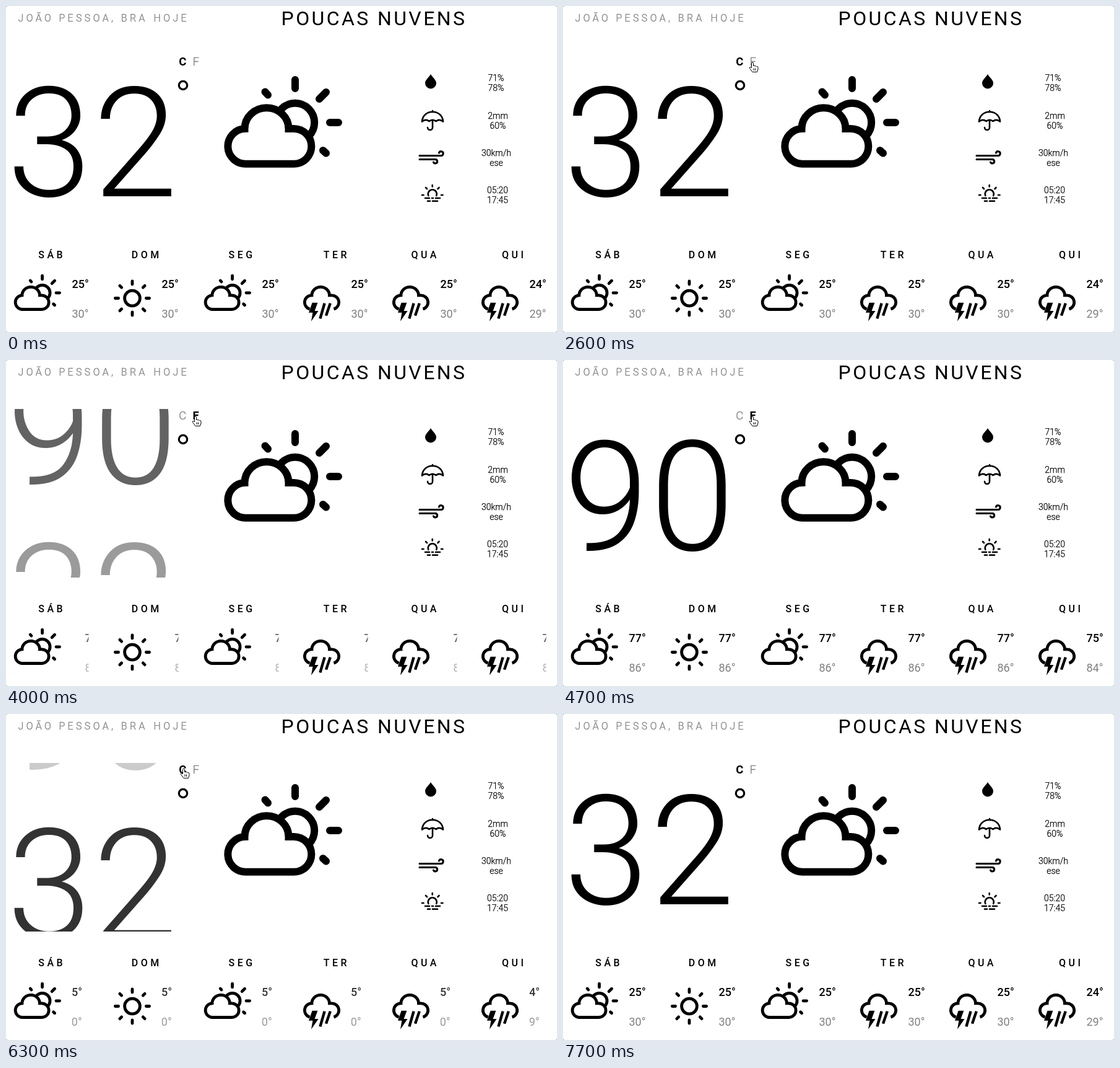
Recreate the animation shown at these times as an HTML page. Size 890 by 526 pixels, loop 7.8 s.

```html
<!DOCTYPE html>
<html lang="pt">
<head>
<meta charset="utf-8">
<title>Tempo</title>
<style>
html, body { margin: 0; width: 100%; height: 100%; overflow: hidden; background: #999; }
#stage { display: block; width: 890px; height: 526px; background: #fff; border-radius: 3px; font-family: Roboto, sans-serif; }
.line { fill: none; stroke: #000; }
.round { stroke-linecap: round; stroke-linejoin: round; }
.grey { fill: #808080; }
.place { font-size: 16px; font-weight: 300; letter-spacing: 4.35px; fill: #808080; stroke: #808080; stroke-width: .3; }
.title { font-size: 32px; letter-spacing: 3.4px; }
.big { font-size: 246px; font-weight: 300; letter-spacing: 2.6px; }
.day { font-size: 16px; font-weight: 500; letter-spacing: 4.5px; }
.deg { font-size: 18px; }
.low { font-weight: 500; }
.info { font-size: 14px; font-weight: 300; text-anchor: middle; stroke: #000; stroke-width: .25; }
.unit { font-size: 18.5px; font-weight: 300; fill: #808080; stroke: #808080; stroke-width: .3; }
.unit.on { font-weight: 700; fill: #000; stroke: none; }
</style>
</head>
<body>
<svg id="stage" viewBox="0 0 890 526">
  <defs>
    <g id="cloudsun" class="line" stroke-width="12">
      <circle cx="467" cy="188" r="31.2"/>
      <path class="round" d="M467 119v14M506 150l11-11M523 188h14M512 233l5 4.5M418.5 138.5l4.5 5"/>
      <path fill="#fff" d="M385.5 198A35.5 33.7 0 0 1 456.500 198H465A28.3 28.3 0 0 1 465 254.700H388A28.3 28.3 0 0 1 385.5 198Z"/>
    </g>
    <g id="sun" class="line round" stroke-width="4.8">
      <circle r="12.4"/>
      <path id="rays"/>
    </g>
    <g id="storm">
      <path class="line" stroke-width="12" d="M377 253.5A28.3 28.3 0 0 1 385.5 198A35.5 33.7 0 0 1 456.5 198H465A28.3 28.3 0 0 1 474 253.5"/>
      <path d="M387 228H409L397 261H412L383 303L389 268H373Z"/>
      <path class="line" stroke-width="11" d="M437 230L419 292M460 230L443 280"/>
    </g>
  </defs>

  <text class="place" x="19.5" y="25">JOÃO PESSOA, BRA</text>
  <text class="place" x="238.6" y="25">HOJE</text>
  <text class="title" x="444.6" y="30.5">POUCAS NUVENS</text>

  <svg y="79" width="276" height="272">
    <g class="celsius"><text class="big" x="1.8" y="227.5">32</text></g>
    <g class="fahr"><text class="big" x="1.8" y="227.5">90</text></g>
  </svg>
  <text id="unitC" class="unit" x="279.2" y="95.5">C</text>
  <text id="unitF" class="unit" x="301.5" y="95.5">F</text>
  <circle class="line" cx="286" cy="128" r="6.7" stroke-width="3.2"/>
  <use href="#cloudsun"/>

  <path d="M686 110C689 115.5 695 119 695 124.5A9 9 0 0 1 677 124.5C677 119 683 115.5 686 110Z"/>
  <g class="line round" stroke-width="2.6">
    <path d="M672 186.5C673 165.5 705 165.5 706 186.5Q700 181.5 694.5 186Q689 181.5 683.5 186Q678 181.5 672 186.5ZM689 169v2M689 185V196a4 4 0 0 1-8 0"/>
    <path stroke-width="3.1" d="M668 241.5H702.5A3.4 3.4 0 1 0 699.5 237M668 247.5H693.5A3.2 3.2 0 1 1 690.5 252"/>
    <path d="M682.3 306A7 7 0 1 1 695.2 306M688.7 289v2.5M678 293l2 2M699.5 293l-2 2M672 305h2.5M703 305h2.500M677 310h7M688 310h2M694 310h7M681 314.8h4M689 314.8h8"/>
  </g>
  <g id="panel"></g>
  <g id="days"></g>

  <g id="cursor" stroke-width="1" stroke-linejoin="round">
    <path id="arrow" stroke="#fff" d="M0 0V15L3.4 11.8L5.8 17L8.2 16L5.9 11H10.5Z"/>
    <path id="hand" fill="#fff" stroke="#000" d="M-1.5 9V1.5Q-1.5 0 0 0T1.5 1.5V5.5Q3 4.5 4 6Q5.8 5 6.6 6.7Q9 6 9 8.5V11L7.5 15.5H0L-4.5 9.5Q-5 7 -3 7.5Z M2 9.5v3.5M4.5 9.5v3.5"/>
  </g>
</svg>
<script>
const $ = id => document.getElementById(id);
const LOOP = 7800, STEP = 100, DROP = 272, SLIDE = 54;

$('rays').setAttribute('d', [0, 1, 2, 3, 4, 5, 6, 7].map(i => {
  const a = i * Math.PI / 4, [r0, r1] = i % 2 ? [24.5, 28.5] : [22.4, 27.6];
  return `M${r0 * Math.cos(a)} ${r0 * Math.sin(a)}L${r1 * Math.cos(a)} ${r1 * Math.sin(a)}`;
}).join(''));

$('panel').innerHTML = [
  [791.5, '71%', 791.5, '78%'],
  [794.5, '2mm', 794.5, '60%'],
  [792, '30km/h', 792, 'ese'],
  [794, '05:20', 794, '17:45']
].map(([x1, a, x2, b], i) => {
  const y = Math.round(121.3 + i * 60.3);
  return `<text class="info" x="${x1}" y="${y}">${a}</text><text class="info" x="${x2}" y="${y + 16}">${b}</text>`;
}).join('');

// name, label x, temperature x, icon, icon x, [low, high] in C and F
const days = [
  ['SÁB', 52.3, 106.5, 'cloudsun', 13, [25, 30], [77, 86]],
  ['DOM', 202.7, 251.5, 'sun', 204, [25, 30], [77, 86]],
  ['SEG', 359.5, 413.5, 'cloudsun', 320, [25, 30], [77, 86]],
  ['TER', 512.8, 557.5, 'storm', 481, [25, 30], [77, 86]],
  ['QUA', 654.4, 701.5, 'storm', 625, [25, 30], [77, 86]],
  ['QUI', 801, 845.5, 'storm', 769, [24, 29], [75, 84]]
];
const pair = (cls, [low, high]) =>
  `<g class="${cls}"><text class="deg low" y="20">${low}°</text><text class="deg grey" y="68">${high}°</text></g>`;
$('days').innerHTML = days.map(([name, labelX, tempX, icon, x, c, f]) => {
  const place = icon === 'sun' ? `translate(${x} 471.5)` : `translate(${x - 141.2} 387.6) scale(.4)`;
  return `<text class="day" x="${labelX}" y="407">${name}</text><use href="#${icon}" transform="${place}"/>` +
    `<svg x="${tempX}" y="435" width="27" height="80">${pair('celsius', c)}${pair('fahr', f)}</svg>`;
}).join('');

// time, x, y of the pointer tip
const path = [
  [600, 420, 540], [700, 405, 452], [1100, 312, 140], [1400, 295.5, 100], [2200, 291, 98],
  [2600, 306, 91], [4900, 306, 91], [5300, 287, 88], [7200, 287, 88], [7700, 330, 540]
];
function pointer(t) {
  const i = path.findIndex(k => k[0] > t);
  if (i < 1) return [420, 540];
  const [t0, x0, y0] = path[i - 1], [t1, x1, y1] = path[i], p = (t - t0) / (t1 - t0);
  return [x0 + (x1 - x0) * p, y0 + (y1 - y0) * p];
}

const easeOut = p => Math.sin(Math.min(1, Math.max(0, p)) * Math.PI / 2);

// the first group is the large number and drops, the others slide sideways
function move(cls, amount, opacity) {
  document.querySelectorAll('.' + cls).forEach((g, i) => {
    const shift = i ? `${-SLIDE * amount} 0` : `0 ${DROP * amount}`;
    g.setAttribute('transform', `translate(${shift})`);
    g.setAttribute('opacity', opacity);
  });
}

function draw(now) {
  const t = Math.floor(now % LOOP / STEP) * STEP;
  const f = easeOut((t - 3532) / 1120) - easeOut((t - 5639) / 1120);
  move('celsius', f, 1 - f);
  move('fahr', f - 1, f);

  const inF = t >= 3600 && t < 5600;
  $('unitC').classList.toggle('on', !inF);
  $('unitF').classList.toggle('on', inF);

  const [x, y] = pointer(t);
  const over = y < 95 && (x < 291.5 || Math.abs(x - 306) < 6);
  $('cursor').setAttribute('transform', `translate(${x} ${y})`);
  $('hand').style.display = over ? '' : 'none';
  $('arrow').style.display = over ? 'none' : '';
}

const start = performance.now();
function tick() {
  draw(performance.now() - start);
  requestAnimationFrame(tick);
}
tick();
</script>
</body>
</html>
```
